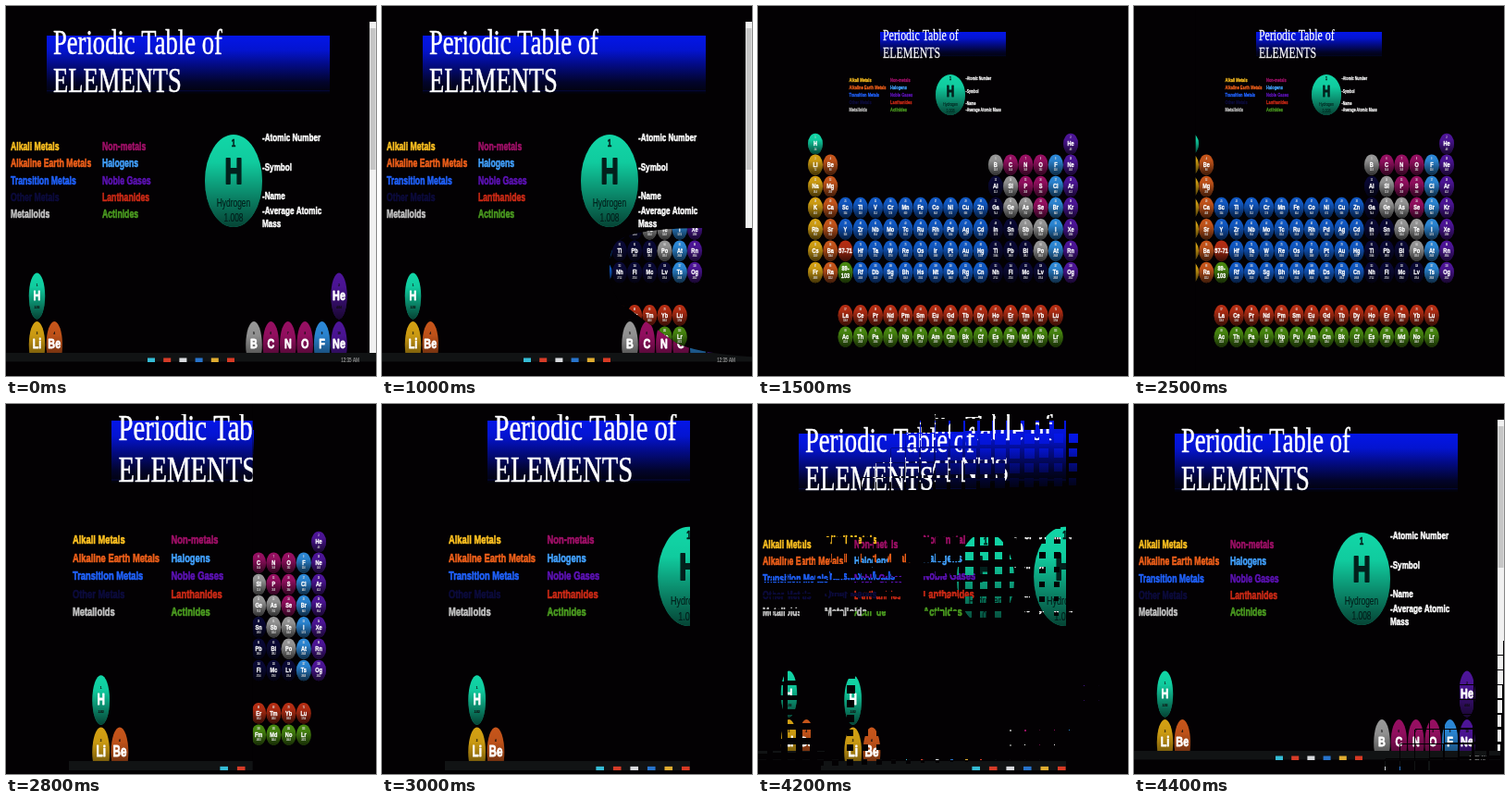
Recreate the animation shown at these times as an HTML page with a canvas. Size 400 by 400 pixels, loop 4500 ms.

```html
<!DOCTYPE html>
<html lang="en">
<head>
<meta charset="utf-8">
<title>Periodic Table of Elements</title>
<style>
html, body { margin: 0; width: 100%; height: 100%; overflow: hidden; background: #030103; }
canvas { display: block; width: 400px; height: 400px; }
</style>
</head>
<body>
<canvas id="stage" width="400" height="400"></canvas>
<script>
const g = document.getElementById('stage').getContext('2d');
const SANS = '"Liberation Sans", Arial, sans-serif';
const SERIF = '"Liberation Serif", "Times New Roman", serif';
const BLACK = '#030103';
const SQUEEZE = 0.7; // the wide slide is shown on a square stage

const colors = {
  h: '#12e2b0', a: '#e0aa14', e: '#d25a1c', t: '#125fd2', o: '#0a0938', m: '#a0a0a0',
  x: '#a01068', f: '#2e90e4', n: '#5216a2', l: '#c03014', c: '#4c9010'
};

// one letter per cell gives the family, symbols follow in order
const rows = [
  ['h................n', 'H He'],
  ['ae..........mxxxfn', 'Li Be B C N O F Ne'],
  ['ae..........omxxfn', 'Na Mg Al Si P S Cl Ar'],
  ['aettttttttttommxfn', 'K Ca Sc Ti V Cr Mn Fe Co Ni Cu Zn Ga Ge As Se Br Kr'],
  ['aettttttttttoommfn', 'Rb Sr Y Zr Nb Mo Tc Ru Rh Pd Ag Cd In Sn Sb Te I Xe'],
  ['aeltttttttttooomfn', 'Cs Ba 57-71 Hf Ta W Re Os Ir Pt Au Hg Tl Pb Bi Po At Rn'],
  ['aectttttttttoooofn', 'Fr Ra 89-103 Rf Db Sg Bh Hs Mt Ds Rg Cn Nh Fl Mc Lv Ts Og'],
  ['..lllllllllllllll.', 'La Ce Pr Nd Pm Sm Eu Gd Tb Dy Ho Er Tm Yb Lu'],
  ['..ccccccccccccccc.', 'Ac Th Pa U Np Pu Am Cm Bk Cf Es Fm Md No Lr']
];
const rowY = [149, 171.7, 195, 218, 241.3, 264.7, 288, 334.3, 357.7];

const legend = [
  ['Alkali Metals', '#ffc221', 0, 0], ['Alkaline Earth Metals', '#f0601a', 0, 1],
  ['Transition Metals', '#2063ff', 0, 2], ['Other Metals', '#0c0b3c', 0, 3],
  ['Metalloids', '#c2c2c2', 0, 4], ['Non-metals', '#a01068', 1, 0],
  ['Halogens', '#42a2ff', 1, 1], ['Noble Gases', '#5c12b4', 1, 2],
  ['Lanthanides', '#cc2a16', 1, 3], ['Actinides', '#4b9c20', 1, 4]
];

function rect(x, y, w, h, fill) {
  g.fillStyle = fill;
  g.fillRect(x, y, w, h);
}

// a thin outline makes bold text a little heavier
function text(s, x, y, size, fill, align = 'left', font = SANS, weight = 'bold') {
  g.save();
  g.translate(x, y);
  g.scale(SQUEEZE, 1);
  g.font = `${weight} ${size}px ${font}`;
  g.textAlign = align;
  g.textBaseline = 'middle';
  g.fillStyle = g.strokeStyle = fill;
  g.lineWidth = size * (weight == 'bold' ? 0.05 : 0.015);
  g.lineJoin = 'round';
  g.fillText(s, 0, 0);
  g.strokeText(s, 0, 0);
  g.restore();
}

function verticalFade(y, h, stops) {
  const fade = g.createLinearGradient(0, y, 0, y + h);
  stops.forEach(([at, color]) => fade.addColorStop(at, color));
  return fade;
}

function ball(x, y, rx, ry, color) {
  g.beginPath();
  g.ellipse(x, y, rx, ry, 0, 0, 7);
  g.fillStyle = color;
  g.fill();
  g.fillStyle = verticalFade(y - ry, 2 * ry,
    [[0, 'rgba(0,0,0,.05)'], [0.3, 'rgba(0,0,0,.1)'], [1, 'rgba(0,0,0,.7)']]);
  g.fill();
}

function heading(x, y, w, h, tx, y1, y2, size) {
  rect(x, y, w, h, verticalFade(y, h,
    [[0, '#0416e8'], [0.25, '#0414d0'], [0.5, '#030b84'], [0.8, '#02042c'], [1, '#020208']]));
  rect(x, y + h * 0.94, w, h / 63, '#04083c');
  text('Periodic Table of', tx, y1, size, '#fff', 'left', SERIF, 'normal');
  text('ELEMENTS', tx, y2, size, '#fff', 'left', SERIF, 'normal');
}

function drawLegend(x, y, dx, dy, size) {
  for (const [name, color, col, row] of legend) text(name, x + col * dx, y + row * dy, size, color);
}

// large hydrogen sample, k = size relative to the zoomed view
function sample(x, y, rx, ry, k) {
  ball(x, y, rx, ry, colors.h);
  const ink = '#03201c';
  text('1', x, y - 40.5 * k, 11.5 * k, ink, 'center');
  text('H', x, y - 7 * k, 38 * k, ink, 'center');
  text('Hydrogen', x, y + 25 * k, 12 * k, ink, 'center', SANS, 'normal');
  text('1.008', x, y + 41 * k, 12 * k, ink, 'center', SANS, 'normal');
}

function zoomed() {
  rect(0, 0, 400, 400, BLACK);
  heading(44, 32, 306, 63, 51, 42, 83.5, 38);
  drawLegend(5, 152.8, 99, 18.2, 12.4);
  sample(246, 189, 31, 50, 1);
  [['-Atomic Number', 143], ['-Symbol', 174.5], ['-Name', 205.5],
   ['-Average Atomic', 221.5], ['Mass', 236]]
    .forEach(([s, y]) => text(s, 277, y, 11.6, '#fff'));

  const cell = (s, x, y, kind, z) => {
    ball(x, y, 8.7, 25, colors[kind]);
    text(z, x, y - 12, 4, '#111', 'center');
    text(s, x, y, 15.5, '#fff', 'center');
    text((z * 2.02).toFixed(2), x, y + 12, 4, '#111', 'center');
  };
  cell('H', 33.5, 313.5, 'h', 1);
  cell('He', 360, 313.5, 'n', 2);
  cell('Li', 33.5, 366, 'a', 3);
  cell('Be', 52.3, 366, 'e', 4);
  ['B', 'C', 'N', 'O', 'F', 'Ne'].forEach((s, i) =>
    cell(s, 268 + i * 18.4, 366, 'mxxxfn'[i], 5 + i));

  rect(0, 375, 400, 25, BLACK);
  rect(0, 375, 400, 9.5, '#111314');
  ['#35bcd6', '#d63c28', '#d8dade', '#2874cc', '#e0ac30', '#d83a24'].forEach((c, i) =>
    rect(153 + i * 17.2, 380.5, 8, 4.5, c));
  text('12:35 AM', 372, 383.5, 6.5, '#a5a5a5', 'center', SANS, 'normal');

  rect(393, 17, 7, 358, '#f1f1f1');
  rect(393.5, 24, 6, 153, '#c6c6c6');
}

function table() {
  rect(0, 0, 400, 400, BLACK);
  heading(132, 28, 136, 27, 135, 33, 51.5, 17);
  drawLegend(98.5, 80, 44.5, 8.1, 5.7);
  sample(208, 96, 16, 22, 0.44);
  [['-Atomic Number', 79], ['-Symbol', 93], ['-Name', 106], ['-Average Atomic Mass', 113]]
    .forEach(([s, y]) => text(s, 224.5, y, 5.1, '#fff'));

  let z = 0;
  rows.forEach(([kinds, names], r) => {
    const list = names.split(' ');
    if (r == 7) z = 56;
    if (r == 8) z = 88;
    [...kinds].forEach((kind, c) => {
      if (kind == '.') return;
      const s = list.shift(), x = 62 + c * 16.24, y = rowY[r];
      ball(x, y, 8, 11.2, colors[kind]);
      if (s == '57-71') {
        text(s, x, y, 8, '#fff', 'center');
        z = 71;
      } else if (s == '89-103') {
        text('89-', x, y - 4, 8, '#fff', 'center');
        text('103', x, y + 4, 8, '#fff', 'center');
        z = 103;
      } else {
        z++;
        text(z, x, y - 6.5, 2.6, '#ddd', 'center');
        text(s, x, y, 8, '#fff', 'center');
        text((z * 2.4).toFixed(1), x, y + 6, 2.6, '#ccc', 'center');
      }
    });
  });
}

// zoomed view, enlarged and seen through a narrower window
function shifted() {
  rect(0, 0, 400, 400, BLACK);
  g.save();
  g.beginPath();
  g.rect(68, 11, 265, 385);
  g.clip();
  g.transform(1.077, 0, 0, 1.073, 66.6, -16.4);
  zoomed();
  g.restore();
}

function reveal(path, scene) {
  g.save();
  g.clip(path);
  scene();
  g.restore();
}

// rounded patch growing out of the lower right
function patch(k) {
  const blob = new Path2D('M410 240H345Q270 241 255 254Q245 262 246 290Q250 322 268 328Q290 345 318 364Q340 376 410 380Z');
  const s = 1 + k * 0.8, path = new Path2D();
  path.addPath(blob, new DOMMatrix([s, 0, 0, s, 400 * (1 - s), 320 * (1 - s)]));
  return path;
}

function wipe(k) {
  const path = new Path2D();
  path.rect(0, 0, 400 * (k + 1) / 6, 400);
  return path;
}

// grid of squares that grow, the upper left first
function squares(k) {
  const path = new Path2D(), front = 236 * (k + 1);
  for (let y = 0; y < 400; y += 16)
    for (let x = 0; x < 400; x += 16) {
      const side = Math.round(16 * Math.min(1, (front - x - y) / 560));
      if (side > 0) path.rect(x, y, side, side);
    }
  return path;
}

function draw(now) {
  const t = now % 4500;
  const step = start => Math.floor((t - start) / 100);
  if (t < 1000) zoomed();
  else if (t < 1500) { zoomed(); reveal(patch(step(1000)), table); }
  else if (t < 2500) table();
  else if (t < 3000) { table(); reveal(wipe(step(2500)), shifted); }
  else if (t < 4000) shifted();
  else { shifted(); reveal(squares(step(4000)), zoomed); }
  requestAnimationFrame(draw);
}
draw(0);
</script>
</body>
</html>
```
